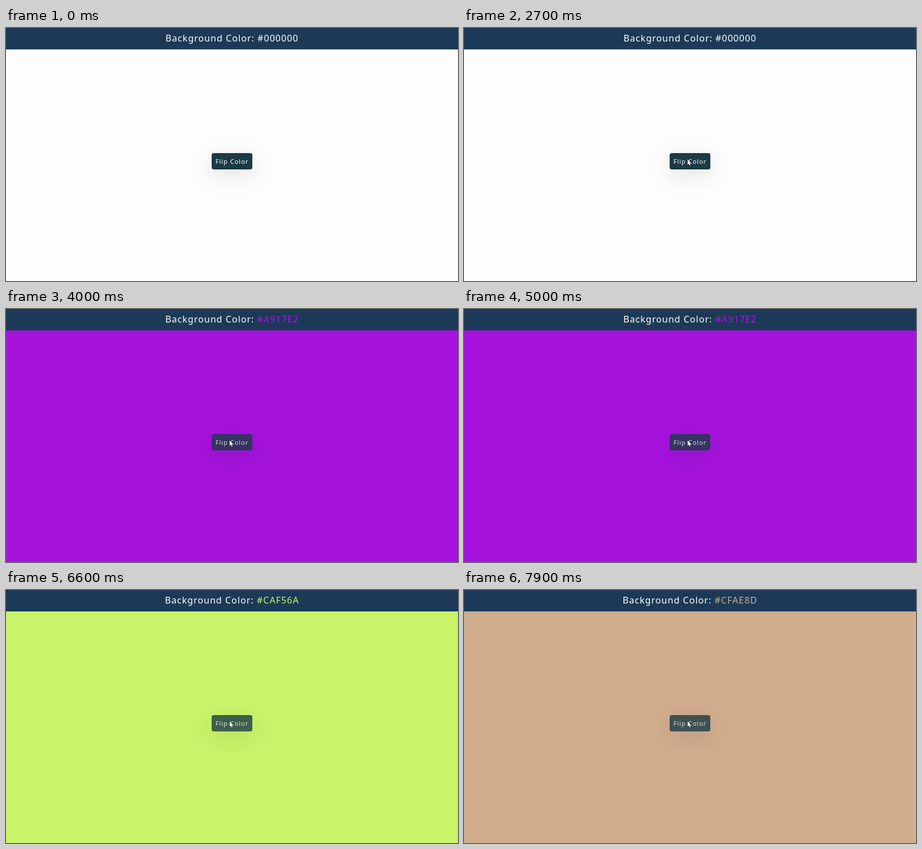
An HTML page with a canvas that plays this animation: 800 px wide and 449 px high, repeating every 8000 ms.

```html
<!DOCTYPE html>
<html lang="en">
<head>
<meta charset="utf-8">
<title>Color flipper</title>
<style>
  html, body { margin: 0; width: 100%; height: 100%; overflow: hidden; }
  canvas { display: block; }
</style>
</head>
<body>
<canvas id="stage" width="800" height="449"></canvas>
<script>
const ctx = document.getElementById('stage').getContext('2d');
const WIDTH = 800, HEIGHT = 449, LOOP = 8000;
const FONT = '"Noto Sans", sans-serif';
const CURSOR_AT = 100;
const BUTTON = { x: 364, y: 222, w: 72, h: 29, r: 4 };

const scenes = [
  { at: 0, hex: '#000000', hexColor: '#fff', fill: '#fefdfe', buttonAlpha: 1 },
  { at: 2800, hex: '#A917E2', hexColor: '#a917e2', fill: '#a513dd', buttonAlpha: 0.8 },
  { at: 5300, hex: '#CAF56A', hexColor: '#caf56a', fill: '#c9f369', buttonAlpha: 0.8 },
  { at: 7900, hex: '#CFAE8D', hexColor: '#cfae8d', fill: '#cfad8d', buttonAlpha: 0.8 }
];

function setType(size) {
  ctx.font = `${size}px ${FONT}`;
  ctx.letterSpacing = '1px';
}

function drawHeader({ hex, hexColor }) {
  const label = 'Background Color: ';
  ctx.fillStyle = '#1c3a57';
  ctx.fillRect(0, 0, WIDTH, 38);
  setType(16.1);
  const labelWidth = ctx.measureText(label).width;
  const x = (WIDTH - labelWidth - ctx.measureText(hex).width) / 2;
  ctx.fillStyle = '#fff';
  ctx.fillText(label, x, 24);
  ctx.fillStyle = hexColor;
  ctx.fillText(hex, x + labelWidth, 24);
}

function buttonPath(dx = 0) {
  ctx.roundRect(BUTTON.x + dx, BUTTON.y, BUTTON.w, BUTTON.h, BUTTON.r);
}

function drawButtonShadow() {
  ctx.save();
  ctx.beginPath();
  ctx.rect(0, 0, WIDTH, HEIGHT);
  buttonPath();
  ctx.clip('evenodd');
  // The caster sits off stage so that only its shadow shows.
  ctx.shadowColor = 'rgba(0, 10, 15, 0.12)';
  ctx.shadowBlur = 40;
  ctx.shadowOffsetX = 2000;
  ctx.shadowOffsetY = 10;
  ctx.fillStyle = '#000';
  ctx.beginPath();
  buttonPath(-2000);
  ctx.fill();
  ctx.restore();
}

function drawButton(alpha) {
  ctx.globalAlpha = alpha;
  drawButtonShadow();
  ctx.fillStyle = '#1b3a44';
  ctx.beginPath();
  buttonPath();
  ctx.fill();
  setType(11);
  const label = 'Flip Color';
  ctx.fillStyle = '#fff';
  ctx.fillText(label, (WIDTH - ctx.measureText(label).width) / 2, 241);
  ctx.globalAlpha = 1;
}

function drawCursor() {
  const outline = [[0, 0], [0, 9.2], [2.1, 7.4], [3.6, 10.8], [5.1, 10.1], [3.6, 6.9], [6.4, 6.7]];
  ctx.beginPath();
  outline.forEach(([x, y]) => ctx.lineTo(395.8 + x, 233.2 + y));
  ctx.closePath();
  ctx.lineWidth = 1;
  ctx.strokeStyle = '#17242b';
  ctx.stroke();
  ctx.fillStyle = '#fff';
  ctx.fill();
}

function draw(time) {
  const scene = scenes.findLast(({ at }) => at <= time);
  ctx.fillStyle = scene.fill;
  ctx.fillRect(0, 0, WIDTH, HEIGHT);
  drawHeader(scene);
  drawButton(scene.buttonAlpha);
  if (time >= CURSOR_AT) drawCursor();
}

const start = performance.now();
function tick() {
  draw((performance.now() - start) % LOOP);
  requestAnimationFrame(tick);
}
tick();
</script>
</body>
</html>
```
